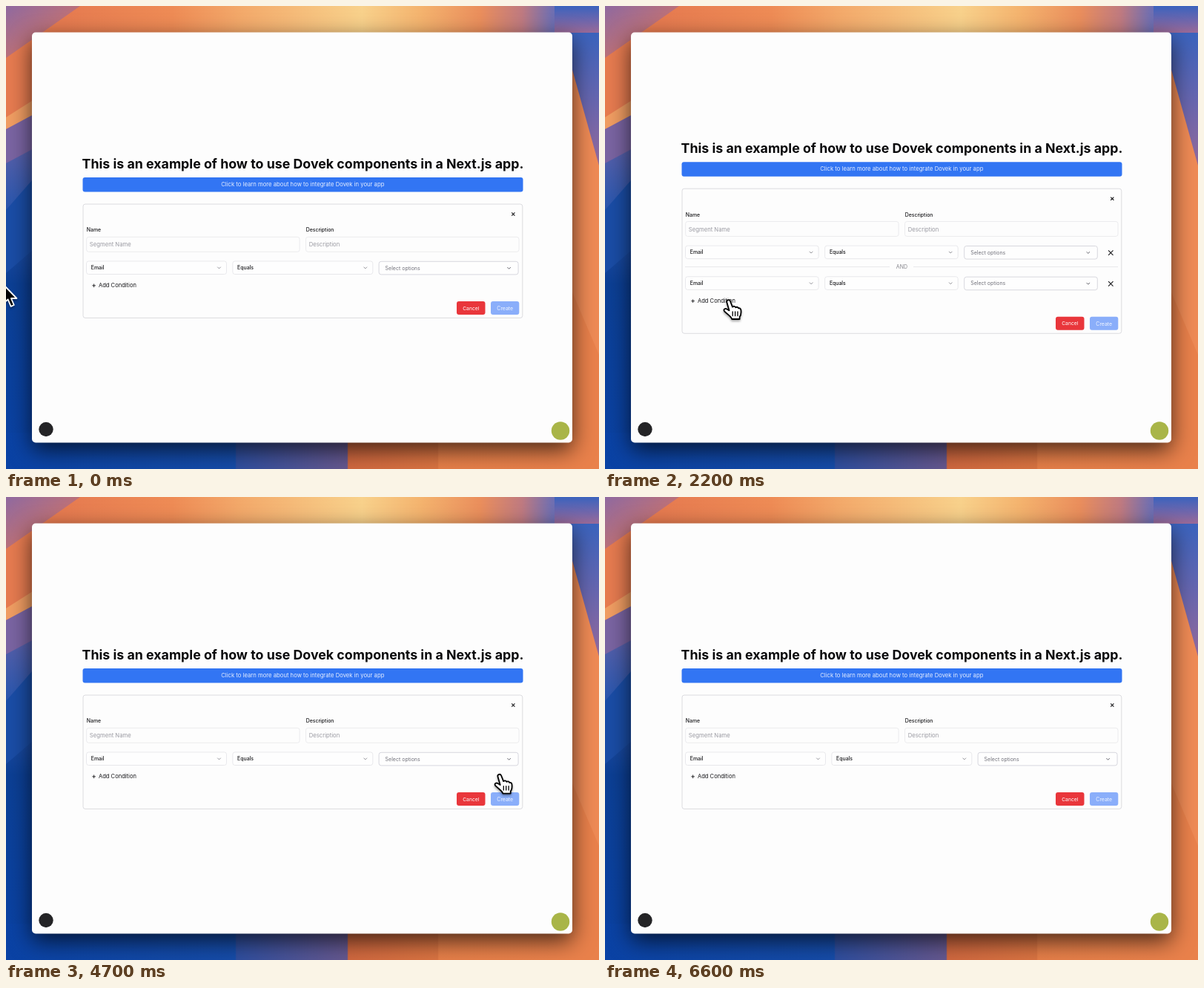
Write an HTML page that moves like this. It is 800 by 624 pixels and loops after 6700 ms.

```html
<!DOCTYPE html>
<html lang="en">
<head>
<meta charset="utf-8">
<title>Segment form</title>
<style>
html, body { margin: 0; width: 100%; height: 100%; overflow: hidden; background: #0b3f98; }
svg { display: block; width: 800px; height: 624px; font-family: Inter, "Liberation Sans", sans-serif; }
.window { filter: drop-shadow(0 10px 15px rgba(0, 0, 0, .68)); }
#cursor { filter: drop-shadow(0 2px 1.5px rgba(0, 0, 0, .35)); }
</style>
</head>
<body>
<svg viewBox="0 0 800 624">
  <defs>
    <linearGradient id="top">
      <stop offset=".1" stop-color="#e67b50"/>
      <stop offset=".28" stop-color="#ee8b55"/>
      <stop offset=".4" stop-color="#f3aa6b"/>
      <stop offset=".6" stop-color="#f8d18b"/>
      <stop offset=".7" stop-color="#f4b36e"/>
      <stop offset=".8" stop-color="#ea8e5c"/>
      <stop offset=".87" stop-color="#bf7a80"/>
      <stop offset=".92" stop-color="#716fb0"/>
      <stop offset="1" stop-color="#3b63bd"/>
    </linearGradient>
    <linearGradient id="corner" gradientUnits="userSpaceOnUse" x1="0" y1="0" x2="50" y2="70">
      <stop offset="0" stop-color="#8f69a0"/>
      <stop offset="1" stop-color="#cf7468"/>
    </linearGradient>
    <linearGradient id="left" x2="0" y2="1">
      <stop offset=".3" stop-color="#5a60a8"/>
      <stop offset=".42" stop-color="#2f58ae"/>
      <stop offset=".6" stop-color="#0c3f94"/>
      <stop offset="1" stop-color="#0a42a4"/>
    </linearGradient>
    <linearGradient id="right" x2="0" y2="1">
      <stop offset="0" stop-color="#3b63bd"/>
      <stop offset=".5" stop-color="#6a66ae"/>
      <stop offset="1" stop-color="#9a6a98"/>
    </linearGradient>
    <linearGradient id="bottom">
      <stop offset="0" stop-color="#0a42a4"/>
      <stop offset=".418" stop-color="#164ca8"/>
      <stop offset=".42" stop-color="#2f4e9e"/>
      <stop offset=".622" stop-color="#66588f"/>
      <stop offset=".624" stop-color="#d0683f"/>
      <stop offset=".787" stop-color="#da7442"/>
      <stop offset=".789" stop-color="#e67f49"/>
      <stop offset="1" stop-color="#e9814b"/>
    </linearGradient>
    <filter id="smear" x="-1" y="-.5" width="3" height="2"><feGaussianBlur id="blur" stdDeviation="0"/></filter>
  </defs>

  <rect width="800" height="624" fill="url(#left)"/>
  <path d="M0 275 35 235V330L0 360Z" fill="#1a4da6"/>
  <path d="M0 165 60 135V180L0 212Z" fill="#7a64a2"/>
  <path d="M0 0H800V80H60V132L0 165Z" fill="url(#top)"/>
  <path d="M0 150 60 112V134L0 166Z" fill="#f09d62"/>
  <path d="M0 0H100L0 70Z" fill="url(#corner)"/>
  <path d="M740 36H800V230H740Z" fill="url(#right)"/>
  <path d="M740 0 800 215V624H740Z" fill="#ee8a55"/>
  <path d="M740 0V36H800V0Z" fill="url(#right)"/>
  <path d="M740 330 800 470V624H740Z" fill="#e9814b"/>
  <rect y="575" width="740" height="49" fill="url(#bottom)"/>
  <rect class="window" x="35" y="35.5" width="729" height="553" rx="5" fill="#fdfdfd"/>
  <circle cx="54" cy="570.5" r="9.7" fill="#242426"/>
  <circle cx="748" cy="572.5" r="12.2" fill="#a9b548"/>

  <g id="page"></g>
  <g id="cursor">
    <g filter="url(#smear)" stroke-linejoin="round">
      <path id="arrow" d="M0 0V24.5L5.6 19.4 9.6 28.8 13.8 27 9.9 18H17.4Z" fill="#000" stroke="#fff" stroke-width="1.8"/>
      <g id="hand" stroke="#000" stroke-linecap="round">
        <path d="M-2.6 2.5C-3.5-.8 .7-2.2 2 .9L5 8.6C6.4 7.2 8.7 7.6 9.3 9.3 10.8 8.2 12.6 8.8 13.1 10.4 14.9 9.8 16.2 11 16.4 12.9 16.9 17 16.2 20 14.6 22V25H4.2C3.6 21.7-2 18.5-6 14.3-7.8 11.8-4.8 10 -2.6 11.5L.6 13.4Z" fill="#fff" stroke-width="1.8"/>
        <path d="M5.2 15V20.5M8.6 15V20.5M12 15V20.5" stroke-width="1.3"/>
      </g>
    </g>
  </g>
</svg>

<script>
const LOOP = 6700, STEP = 100, ROW = 41.7;
const $ = id => document.getElementById(id);

const text = (x, y, size, str, fill = '#18181b', extra = '') =>
  `<text x="${x}" y="${y + size * .36}" font-size="${size}" fill="${fill}" ${extra}>${str}</text>`;
const box = (x, y, w, h, fill, stroke = 'none', r = 3) =>
  `<rect x="${x}" y="${y}" width="${w}" height="${h}" rx="${r}" fill="${fill}" stroke="${stroke}" stroke-width=".8"/>`;
const line = (d, stroke, width) =>
  `<path d="${d}" fill="none" stroke="${stroke}" stroke-width="${width}"/>`;
const cross = (x, y, r, width) =>
  line(`M${x - r} ${y - r}l${2 * r} ${2 * r}m0 ${-2 * r}l${-2 * r} ${2 * r}`, '#18181b', width);
const middle = 'text-anchor="middle"';

function field(x, label, hint) {
  return text(x + .5, 302, 6.9, label, '#18181b', 'font-weight="500"') +
    box(x + .3, 311.3, 287.5, 20, '#fdfdfd', '#e8e8ea') +
    text(x + 4.5, 321.6, 7.7, hint, '#9a9aa2');
}

function select(x, y, w, label, pale) {
  const cy = y + (pale ? .4 : 0), arrowX = x + w - (pale ? 12.5 : 10);
  return box(x, cy - 8.8, w, 17.6, '#fefefe', pale ? '#cfcfd6' : '#e4e4e7') +
    text(x + (pale ? 8.5 : 6.3), cy, pale ? 7 : 6.9, label, pale ? '#71717a' : '#18181b', pale ? '' : 'font-weight="500"') +
    line(`M${arrowX - 2.2} ${cy - 1}l2.2 2.2 2.2-2.2`, pale ? '#52525b' : '#85858c', .9);
}

function condition(y, many) {
  const w = many ? 179.6 : 189, x = i => 108.5 + i * (w + (many ? 8.5 : 8.3));
  return select(x(0), y, w, 'Email') + select(x(1), y, w, 'Equals') +
    select(x(2), y, many ? w : 188, 'Select options', true) +
    (many ? cross(682.3, y + .8, 3.2, 1.1) : '');
}

function page(rows) {
  const extra = (rows - 1) * ROW;
  let s = text(400.5, 212.6, 17.8, 'This is an example of how to use Dovek components in a Next.js app.', '#09090b', middle + ' font-weight="700"') +
    box(103.5, 231, 594, 19.6, '#3275f3') +
    text(400.3, 240.4, 7.7, 'Click to learn more about how to integrate Dovek in your app', '#e6eeff', middle) +
    box(104, 267, 592.8, 153.4 + extra, '#fdfdfd', '#d4d4d8') +
    cross(684.3, 280.5, 2.1, 1.1) +
    field(108.3, 'Name', 'Segment Name') + field(404.2, 'Description', 'Description');
  for (let i = 0; i < rows; i++) {
    const y = 352.7 + i * ROW;
    s += condition(y, rows > 1);
    if (i < rows - 1) s += line(`M108 ${y + 19.7}H384M416 ${y + 19.7}H692`, '#e4e4e7', .8) +
      text(400.4, y + 19.7, 7, 'AND', '#85858c', middle);
  }
  const y = 376.6 + extra;
  s += line(`M116.3 ${y + .2}h4.6m-2.3-2.3v4.6`, '#18181b', .9) + text(125, y, 7.57, 'Add Condition') +
    box(608, y + 21.4, 38.5, 18, '#e9363b') + text(627.3, y + 30.6, 6.8, 'Cancel', '#fff', middle) +
    box(654, y + 21.4, 38.3, 18, '#8aaefa') + text(673.2, y + 30.6, 6.9, 'Create', '#f2f6ff', middle);
  return `<g transform="translate(0 ${-extra / 2})">${s}</g>`;
}

// [time, x, y] of the pointer tip
const path = [
  [0, -3, 376], [200, -2, 378], [1200, 167, 376], [1700, 167, 376], [2000, 167, 397], [2350, 167, 397],
  [2600, 165, 410], [2700, 165, 410], [3600, 685, 393], [4000, 685, 393], [4300, 682, 375],
  [4560, 680, 375], [5650, 373, 366], [5850, 373, 366], [6500, -40, 372], [LOOP, -40, 372]
];
// each click changes the number of rows
const clicks = [[1700, 1], [2400, 1], [3800, -1], [4500, -1]];

function tip(t) {
  const i = Math.max(1, path.findIndex(k => k[0] >= t));
  const [t0, x0, y0] = path[i - 1], [t1, x1, y1] = path[i];
  const u = (t - t0) / (t1 - t0), e = u * u * (3 - 2 * u);
  return [x0 + (x1 - x0) * e, y0 + (y1 - y0) * e];
}

const within = (t, a, b) => t >= a && t < b;
const rowsAt = t => clicks.reduce((n, [at, change]) => t >= at ? n + change : n, 1);
const pressed = t => clicks.some(([at]) => within(t, at - 100, at + 100));
const isHand = t => within(t, 1000, 3000) || within(t, 3400, 4900);

let shown = -1;
function draw(now) {
  const t = Math.floor(now % LOOP / STEP) * STEP;
  if (t !== shown) {
    if (shown < 0 || rowsAt(t) !== rowsAt(shown)) $('page').innerHTML = page(rowsAt(t));
    shown = t;
    const [x, y] = tip(t), [px, py] = tip(Math.max(0, t - 50));
    const smear = d => Math.min(5, Math.max(0, Math.abs(d) - 14) / 5);
    $('cursor').setAttribute('transform', `translate(${x} ${y}) scale(${pressed(t) ? .86 : 1})`);
    $('blur').setAttribute('stdDeviation', `${smear(x - px)} ${smear(y - py)}`);
    $('hand').style.display = isHand(t) ? '' : 'none';
    $('arrow').style.display = isHand(t) ? 'none' : '';
  }
  requestAnimationFrame(draw);
}
draw(0);
</script>
</body>
</html>
```
